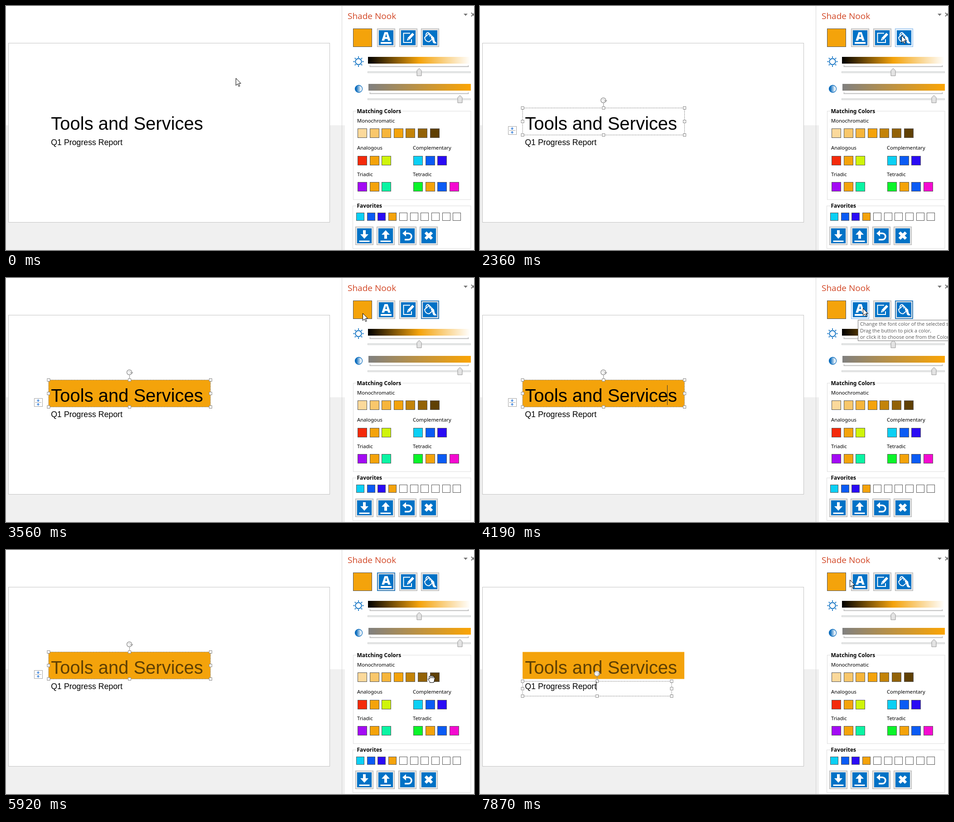
An HTML page for the animation above (8000 ms loop, 1033 by 542 pixels).

```html
<!DOCTYPE html>
<html lang="en">
<head>
<meta charset="utf-8">
<title>Color pane demo</title>
<style>
html, body { margin: 0; width: 100%; height: 100%; overflow: hidden; background: #fff; }
svg { display: block; width: 100vw; height: 100vh; }
.slide { font-family: "Liberation Sans", Arial, sans-serif; }
.label { font: 11.2px "Noto Sans", sans-serif; }
.legend { font: bold 12px "Noto Sans", sans-serif; }
.tip text { font: 10.9px "Open Sans", sans-serif; fill: #575757; }
.swatch { stroke: #555; }
.group { fill: none; stroke: #dcdcdc; }
.edge { fill: #e4e4e4; stroke: #adadad; }
.dots { fill: none; stroke: none; }
.hover .edge { fill: #e5f1fb; stroke: #7eb4ea; }
.focus .edge { fill: #e4e9ee; stroke: #0078d7; }
.focus .dots { stroke: #123; stroke-dasharray: 1 1; }
.line { fill: none; stroke: #fff; stroke-width: 2; }
.handle { fill: #fff; stroke: #8a8a8a; }
</style>
</head>
<body>
<svg viewBox="0 0 1033 542">
  <defs>
    <linearGradient id="light"><stop stop-color="#000"/><stop offset=".5" stop-color="#f4a30b"/><stop offset="1" stop-color="#fff"/></linearGradient>
    <linearGradient id="sat"><stop stop-color="#808080"/><stop offset="1" stop-color="#fca503"/></linearGradient>
    <linearGradient id="half"><stop offset=".15" stop-color="#0a6cbd"/><stop offset=".85" stop-color="#fff"/></linearGradient>
  </defs>

  <path fill="#f0f0f0" d="M0 265H748V542H0Z"/>
  <rect x="5.5" y="82.5" width="709" height="398" fill="#fff" stroke="#c3c3c3"/>
  <path d="M741.5 0V542" stroke="#d4d4d4"/>

  <g class="slide">
    <rect id="fill" x="94" y="226.5" width="357" height="60" fill="#f4a30b"/>
    <text id="title" x="99.3" y="275" font-size="40">Tools and Services</text>
    <text x="99.3" y="309" font-size="17.75">Q1 Progress Report</text>
  </g>
  <g id="titleBox">
    <rect x="62.5" y="267.5" width="18" height="18" fill="#fff" stroke="#a5a5a5"/>
    <path d="M65 276.5H78" stroke="#777" stroke-dasharray="2 1"/>
    <path d="M71 269V274M68.500 271.500 71 274 73.500 271.500M71 284V279M68.500 281.500 71 279 73.500 281.500" fill="none" stroke="#2f7bd9" stroke-width="1.300"/>
  </g>
  <g id="subBox"></g>
  <path id="titleCaret" d="M413.5 238V282" stroke="#333"/>
  <path id="subCaret" d="M257 292V312" stroke="#000"/>

  <text x="754" y="29" fill="#d24726" style="font:19px 'Open Sans',sans-serif">Shade Nook</text>
  <path d="M1010 17H1019L1014.500 22Z" fill="#777"/>
  <path d="M1027 15 1035 23M1035 15 1027 23" stroke="#777" stroke-width="2"/>
  <rect class="swatch" x="766.5" y="50.5" width="41" height="40" fill="#f4a30b"/>

  <g id="pane"></g>

  <g id="sun" fill="none" stroke="#1474c4" stroke-width="2" transform="translate(778 123.5)"><circle r="6.700"/></g>
  <circle cx="778.500" cy="184" r="8" fill="url(#half)" stroke="#0a6cbd" stroke-width="1.300"/>
  <rect x="799" y="113" width="226" height="15" fill="url(#light)"/>
  <rect x="800" y="173" width="226" height="15" fill="url(#sat)"/>

  <rect class="group" x="766.5" y="233.5" width="259.500" height="196.500"/>
  <rect class="group" x="765.5" y="444" width="260.500" height="94.500"/>

  <g id="legends"></g>

  <g id="tip" class="tip">
    <rect x="834.5" y="93.5" width="230" height="46" fill="#fff" stroke="#767676"/>
    <text x="839" y="106">Change the font color of the selected shape.</text>
    <text x="839" y="120.500">Drag the button to pick a color,</text>
    <text x="839" y="135">or click it to choose one from the Color dialog.</text>
  </g>

  <g id="cursor">
    <path id="arrow" d="M.5.5V16.500L4.200 13 6.700 18.700 9.100 17.700 6.600 12H11.500Z" fill="#fff" stroke="#000"/>
    <path id="beam" d="M-3.500-8H-1Q0-8 0-7Q0-8 1-8H3.500M0-7V7M-3.500 8H-1Q0 8 0 7Q0 8 1 8H3.500" fill="none" stroke="#222"/>
    <g id="dropper" stroke="#000">
      <circle r="9.500" fill="none" stroke-width="1.200"/>
      <path d="M0 0 1-3 8.500-11 11-8.500 3-1Z" fill="#fff"/>
      <path d="M7.500-13 13-7.500M10-10 14-15.500" stroke-width="2.500"/>
      <path d="M11-12 14-15" stroke-width="4.500"/>
    </g>
    <path id="hand" d="M-3.500 8.500V6.500L-7 2Q-8-.5-5.500-.2L-4 1-5.500-4Q-5.200-6.500-3.300-5.500Q-2.500-8-.5-6.600Q1.500-8 2.600-5.800Q5-6.500 5.500-4Q7.700-4 7.500-1.500L6.500 4 5 8.500ZM-3.300-5.500-1.800-1M-.5-6.600.3-1.400M2.600-5.800 2.700-1.200M5.500-4 5-1" fill="#fff" stroke="#000"/>
  </g>
</svg>
<script>
const $ = id => document.getElementById(id);
const add = (id, markup) => $(id).insertAdjacentHTML('beforeend', markup);

function swatches(x, y, colors, size = 20, step = 26.6) {
  colors.forEach((c, i) => add('pane',
    `<rect class="swatch" x="${Math.round(x + i * step) + .5}" y="${y + .5}" width="${size}" height="${size}" fill="${c}"/>`));
}

function button(id, x, y, icon) {
  add('pane', `<g id="${id}" transform="translate(${x} ${y})">
    <rect class="edge" x=".5" y=".5" width="39" height="40"/>
    <rect class="dots" x="1.5" y="1.500" width="37" height="38"/>
    <rect x="4" y="4" width="32" height="33" fill="#0072c6"/>${icon}</g>`);
}

function slider(y, thumb) {
  add('pane', `<path d="M803.500 ${y - 15}V${y - 12.5}H1020.500V${y - 15}" fill="none" stroke="#bfbfbf" stroke-width="2"/>
    <rect x="798.5" y="${y - 1.5}" width="227" height="3" fill="#e9eaea" stroke="#d3d5d5"/>
    <path d="M${thumb} ${y - 8.5}l5 5V${y + 8}h-10V${y - 3.5}Z" fill="#e3e3e3" stroke="#929292"/>`);
}

function selection(id, x, y, w, h) {
  const cx = x + w / 2, top = y - 17;
  add(id, `<rect x="${x}" y="${y}" width="${w}" height="${h}" fill="none" stroke="#777" stroke-dasharray="2 1.500"/>
    <path d="M${cx} ${y}v-11" stroke="#888"/>
    <circle cx="${cx - .5}" cy="${top}" r="5.500" fill="#fff" stroke="#999" stroke-width="1.500"/>
    <path d="M${cx + 2} ${top}h6l-3 3.500Z" fill="#999"/>
    <path d="M${cx - 3} ${top}a2.500 2.500 0 1 1 2.500 2.500" fill="none" stroke="#bbb"/>`);
  for (const i of [0, .5, 1]) for (const j of [0, .5, 1])
    if (!(i === .5 && j === .5))
      add(id, `<rect class="handle" x="${x + w * i - 3}" y="${y + h * j - 3}" width="6" height="6"/>`);
}

const orange = '#f4a30b', blue = '#0b5bf4', cyan = '#0bd0f4', indigo = '#2a0bf4', dark = '#5f4004';
swatches(776, 272, ['#fbd99b', '#f9c76b', '#f6b53b', orange, '#c38309', '#926207', dark]);
swatches(776, 333, ['#f42a0b', orange, '#cff40b']);
swatches(899, 333, [cyan, blue, indigo]);
swatches(776, 391, ['#a30bf4', orange, '#0bf4a3']);
swatches(899, 391, ['#0bf42a', orange, blue, '#f40bd0']);
swatches(773, 459, [cyan, blue, indigo, orange, ...Array(6).fill('#fff')], 17, 23.7);

const base = '<path d="M8.500 31H31.500V34H8.500Z" fill="#fff"/>';
button('fontBtn', 819, 50, `<text x="20" y="27" text-anchor="middle" fill="#fff" style="font:800 27px 'Open Sans',sans-serif">A</text>
  <path d="M8 30H32V34H8Z" fill="#fff"/>`);
button('lineBtn', 868, 50, `<path class="line" d="M24 10.500H9.500V31H27V24"/>
  <path d="M17 27 18.500 21 29 9.500 33 13.500 22.500 25Z" fill="#fff"/><path d="M19 22 22 25" stroke="#0072c6"/>`);
button('fillBtn', 916, 50, `<path class="line" d="M8 20 18 11 28 21 18 29.500Q9 29 8 20ZM11 18Q10 10 15 9Q19 9 20 18"/>
  <path d="M22 17Q30 18 30 26Q31 30 35 32.500Q28 35 26 30Q25 24 22 21Z" fill="#fff"/>`);
button('loadBtn', 771, 490, `<path d="M17 8H23V17H29L20 27 11 17H17Z" fill="#fff"/>${base}`);
button('saveBtn', 818, 490, `<path d="M17 27H23V18H29L20 8 11 18H17Z" fill="#fff"/>${base}`);
button('undoBtn', 866, 490, `<path class="line" style="stroke-width:3.500" d="M13 15H22A6.700 6.700 0 0 1 22 29H14"/>
  <path d="M9 15 17 8V22Z" fill="#fff"/>`);
button('clearBtn', 913, 490, '<path class="line" style="stroke-width:6.500" d="M13 13 27 27M27 13 13 27"/>');

slider(147, 912);
slider(207, 1002);
for (let a = 0; a < 360; a += 45) add('sun', `<path d="M0-8.500V-11.500" transform="rotate(${a})"/>`);
selection('titleBox', 94, 226.5, 357.5, 60);
selection('subBox', 94, 291.5, 329, 33);

const label = (x, y, s) => add('legends', `<text class="label" x="${x}" y="${y}">${s}</text>`);
const legend = (y, s, w) => add('legends',
  `<path d="M773 ${y - 10}h${w}v12h-${w}Z" fill="#fff"/><text class="legend" x="774.5" y="${y}">${s}</text>`);
legend(238, 'Matching Colors', 102);
legend(448, 'Favorites', 60);
label(775, 258.5, 'Monochromatic');
label(775, 319, 'Analogous');
label(898, 319, 'Complementary');
label(775, 378, 'Triadic');
label(898, 378, 'Tetradic');

// Pointer stops per shape: start time, step in ms, then positions.
const moves = [
  ['arrow', 0, 250, '507,160'],
  ['arrow', 250, 120, '472,202 417,262 424,283'],
  ['beam', 900, 270, '419,274 426,274'],
  ['arrow', 1320, 280, '582,164'],
  ['arrow', 1600, 120, '650,145 730,121 805,99 865,82 905,71 920,65'],
  ['arrow', 2360, 430, '930,65'],
  ['dropper', 2790, 120, '925,75 895,82 850,86 806,82 787,78'],
  ['arrow', 3560, 120, '787,78 812,77 834,72'],
  ['arrow', 4070, 550, '845,67'],
  ['dropper', 4620, 150, '851,126 857,149'],
  ['dropper', 4890, 120, '896,197 928,240'],
  ['dropper', 5160, 120, '935,265 938,281 938,285'],
  ['hand', 5920, 120, '939,286 975,288'],
  ['arrow', 6160, 150, '1022,293 1024,298'],
  ['arrow', 6460, 120, '720,304 340,309 227,311'],
  ['beam', 6850, 270, '262,320'],
  ['arrow', 7120, 120, '310,305 355,293'],
  ['arrow', 7390, 120, '440,245 570,172 690,113 775,80 816,66']
];
const stops = moves.flatMap(([shape, start, step, path]) =>
  path.split(' ').map((p, i) => ({ t: start + i * step, shape, p })));

const inks = [[0, '#000'], [4770, '#76500a'], [4890, '#fff'], [5280, dark]].map(([t, color]) => ({ t, color }));
const current = (list, t) => list.findLast(e => e.t <= t);
const within = (t, ...spans) => spans.some(([a, b]) => t >= a && t < b);
const show = (id, on) => $(id).setAttribute('visibility', on ? 'visible' : 'hidden');

function mark(id, hover, focus) {
  $(id).classList.toggle('hover', hover);
  $(id).classList.toggle('focus', focus);
}

function draw(now) {
  const t = now % 8000, stop = current(stops, t);
  for (const shape of ['arrow', 'beam', 'dropper', 'hand']) show(shape, shape === stop.shape);
  $('cursor').setAttribute('transform', `translate(${stop.p})`);
  $('title').setAttribute('fill', current(inks, t).color);
  show('fill', t >= 3150);
  show('titleBox', within(t, [1050, 7000]));
  show('subBox', t >= 7000);
  show('titleCaret', within(t, [1170, 1720], [4190, 4620], [5650, 5770], [6310, 6850]));
  show('subCaret', t >= 7000);
  show('tip', within(t, [4070, 4500]));
  mark('fillBtn', within(t, [2080, 2640]), within(t, [2640, 4500]));
  mark('fontBtn', within(t, [3800, 4500]), within(t, [4500, 7000]));
  requestAnimationFrame(() => draw(performance.now()));
}
draw(performance.now());
</script>
</body>
</html>
```
